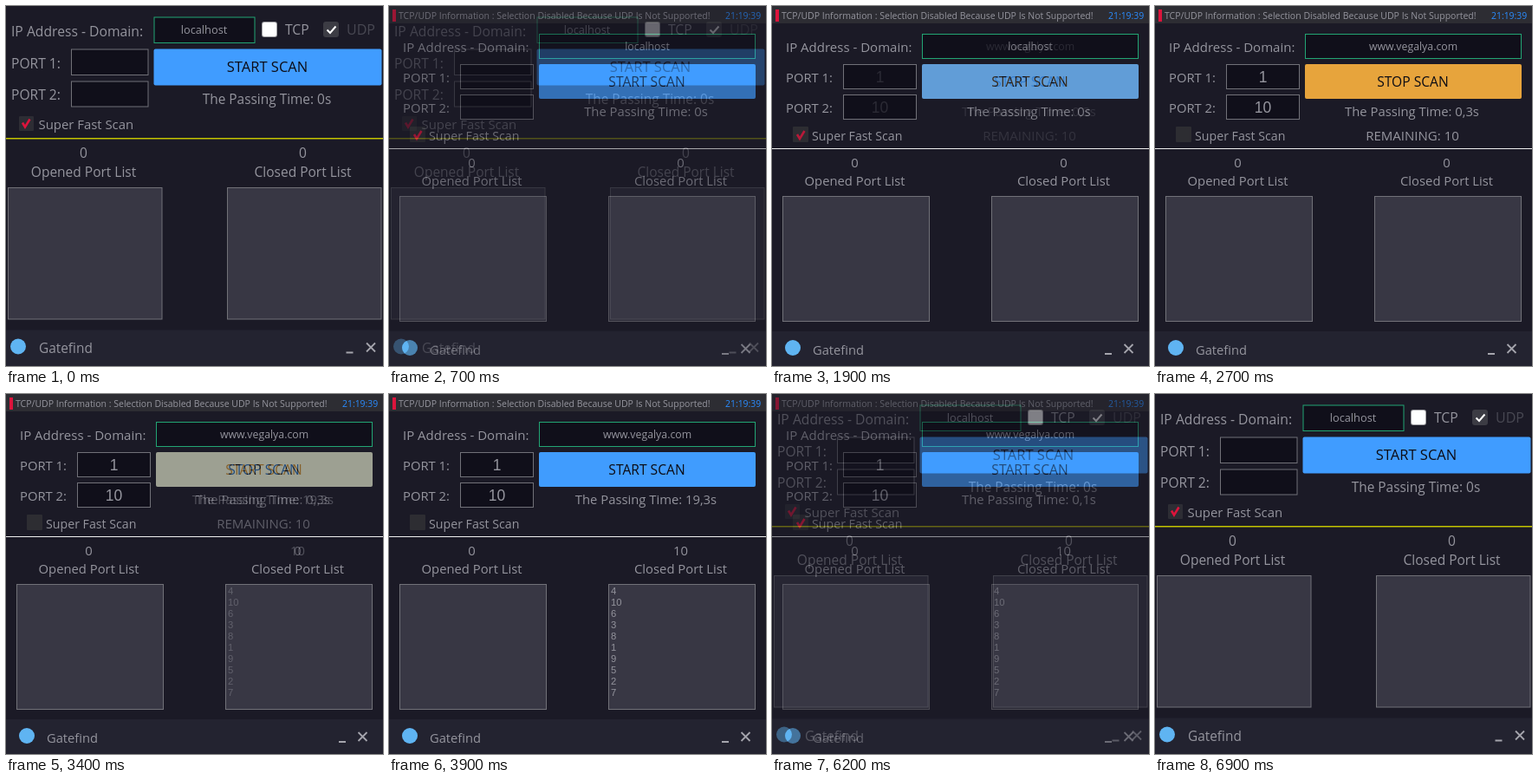
An HTML page for the animation above (7020 ms loop, 435 px wide and 415 px high).

```html
<!DOCTYPE html>
<html lang="en">
<head>
<meta charset="utf-8">
<title>Port scanner</title>
<style>
html, body { margin: 0; width: 100%; height: 100%; overflow: hidden; background: #1b1a26; }
svg { display: block; width: 435px; height: 415px; }
text { font-family: "Open Sans", "Noto Sans", sans-serif; fill: #95959e; white-space: pre; }
.mono { font-family: "Liberation Sans", Arial, sans-serif; }
</style>
</head>
<body>
<svg id="stage" viewBox="0 0 435 415"></svg>
<script>
const LOOP = 7020, HOLD = 1400, LEAD = 900, STEP = 100;
const GREEN = '#22a574', GREY = '#717178', BLUE = '#409cff', RED = '#dc143c';

const rect = (x, y, w, h, fill, r = 0) =>
  `<rect x="${x}" y="${y}" width="${w}" height="${h}" rx="${r}" fill="${fill}"/>`;

const box = (x, y, w, h, fill = '#100f1a', stroke = GREY) =>
  `<rect x="${x + .5}" y="${y + .5}" width="${w - 1}" height="${h - 1}" fill="${fill}" stroke="${stroke}"/>`;

const text = (str, x, y, size, extra = '') =>
  `<text x="${x}" y="${y}" font-size="${size}" ${extra}>${str}</text>`;

const centred = (str, x, y, size, extra = '') =>
  text(str, x, y, size, `text-anchor="middle" ${extra}`);

const line = (d, stroke, width) =>
  `<path d="${d}" fill="none" stroke="${stroke}" stroke-width="${width}"/>`;

const button = (x, y, w, h, label, size, fill = BLUE) =>
  rect(x, y, w, h, fill, 2) +
  centred(label, x + w / 2 - .5, y + h / 2 + size * .36, size, 'style="fill:#0c0c14"');

const redTick = (x, y) =>
  line(`M${x + 5} ${y + 8}l3 5l5.5 -9`, RED, 2.6);

function footer(x, y, titleX, size, minX, closeX) {
  return rect(0, y, 435, 415 - y, '#232330') +
    `<circle cx="${x}" cy="${y + 19}" r="9" fill="#5fb4f2"/>` +
    text('Gatefind', titleX, y + 26.5, size) +
    line(`M${minX} ${y + 26}h8`, '#a5a5ad', 2) +
    line(`M${closeX} ${y + 15}l10 10m0 -10l-10 10`, '#a5a5ad', 1.8);
}

function startScreen() {
  return rect(0, 0, 435, 415, '#1b1a26') +
    text('IP Address - Domain:', 6, 35, 15.7) +
    box(170.5, 12.5, 117, 30.5, undefined, GREEN) +
    centred('localhost', 228.5, 32, 12.8) +
    rect(295, 18, 18, 18, '#a0a0a4', 3) + rect(296, 19, 16, 16, '#fff', 2) +
    text('TCP', 322, 32.5, 15.7) +
    rect(366, 18, 18, 18, '#3c3c44', 3) +
    line('M370.5 27.5l3.500 3.500l6.500 -7.500', '#fff', 2) +
    text('UDP', 393, 32.5, 16, 'style="fill:#484852"') +
    text('PORT 1:', 6, 71.5, 15.6) + box(75, 49.5, 89.5, 30.5) +
    text('PORT 2:', 6, 107.5, 15.6) + box(75, 86.5, 89.5, 30) +
    button(170.5, 49.5, 263, 42, 'START SCAN', 16.5) +
    centred('The Passing Time: 0s', 301, 112.5, 15.4) +
    rect(15, 127, 17, 17, '#2d2d34', 1) + redTick(14, 126.5) +
    text('Super Fast Scan', 37.5, 141.5, 14.9) +
    rect(0, 152, 435, 1.5, '#c4c400') +
    [[89.5, 2, 'Opened'], [342.5, 255, 'Closed']].map(([mid, x, name]) =>
      centred('0', mid, 174.5, 15.5) +
      centred(name + ' Port List', mid, 196.5, 15.5) +
      box(x, 209, 178.5, 152.5, '#383744')).join('') +
    footer(14, 373.5, 38, 15.4, 392.5, 416);
}

function scanScreen({ host = 'www.vegalya.com', ports = ['1', '10'], time, fast, running, closed = [] }) {
  return rect(0, 0, 435, 415, '#1b1a26') +
    rect(0, 0, 435, 20, '#2d2d33') + rect(4, 4, 4, 14, RED) +
    text('TCP/UDP Information : Selection Disabled Because UDP Is Not Supported!', 11, 14.7, 10.5) +
    text('21:19:39', 388, 14.7, 10.4, 'style="fill:#2a8cff"') +
    text('IP Address - Domain:', 16, 53, 15) +
    box(173, 32, 250, 29, undefined, GREEN) + centred(host, 298, 51, 12.3) +
    [0, 1].map(i =>
      text(`PORT ${i + 1}:`, 16, 87.5 + 35 * i, 14.8) +
      box(82, 67 + 35 * i, 85, 29) +
      centred(ports[i] || '', 124.5, 88 + 35 * i, 17.5, 'class="mono"')).join('') +
    button(173, 67, 250, 40, running ? 'STOP SCAN' : 'START SCAN', 15.6, running ? '#e7a43c' : BLUE) +
    centred(`The Passing Time: ${time}s`, 296.5, 127, 14.8) +
    (running ? centred('REMAINING: 10', 297, 155, 15) : '') +
    rect(24, 139, 18, 18, '#2d2d32', 1) + (fast ? redTick(24, 140) : '') +
    text('Super Fast Scan', 46, 155, 14.2) +
    rect(0, 164, 435, 1, '#f0f0f0') +
    [[95.5, 12, 'Opened', 0], [336.5, 253, 'Closed', closed.length]].map(([mid, x, name, count]) =>
      centred(count, mid, 186, 14.8) +
      centred(name + ' Port List', mid, 206.5, 14.8) +
      box(x, 219, 170, 145, '#383744')).join('') +
    closed.map((port, i) => text(port, 256, 231 + 13 * i, 11.3, 'class="mono"')).join('') +
    footer(24, 375, 47, 14.7, 384, 406.5);
}

const closed = [4, 10, 6, 3, 8, 1, 9, 5, 2, 7];
const stage = document.getElementById('stage');
stage.innerHTML = [
  startScreen(),
  scanScreen({ host: 'localhost', ports: [], time: '0', fast: true }),
  scanScreen({ time: '0,3', running: true }),
  scanScreen({ time: '19,3', closed }),
  scanScreen({ time: '0,1', fast: true, closed }),
  startScreen()
].map(content => `<g>${content}</g>`).join('');
const scenes = [...stage.children];

// Each step blends the next screen over the previous result, ever more strongly.
function blend(step) {
  let rest = 1;
  for (let i = 1; i <= step; i++) rest *= Math.max(0, .9 - i / 10);
  return 1 - rest;
}

function draw(now) {
  const t = now % LOOP + LEAD;
  const top = Math.floor(t / HOLD);
  const mix = blend(Math.floor(t % HOLD / STEP) + 1);
  scenes.forEach((scene, i) => {
    scene.style.display = i === top || i === top - 1 ? '' : 'none';
    scene.style.opacity = i === top ? mix : 1;
  });
  requestAnimationFrame(draw);
}
draw(performance.now());
</script>
</body>
</html>
```
